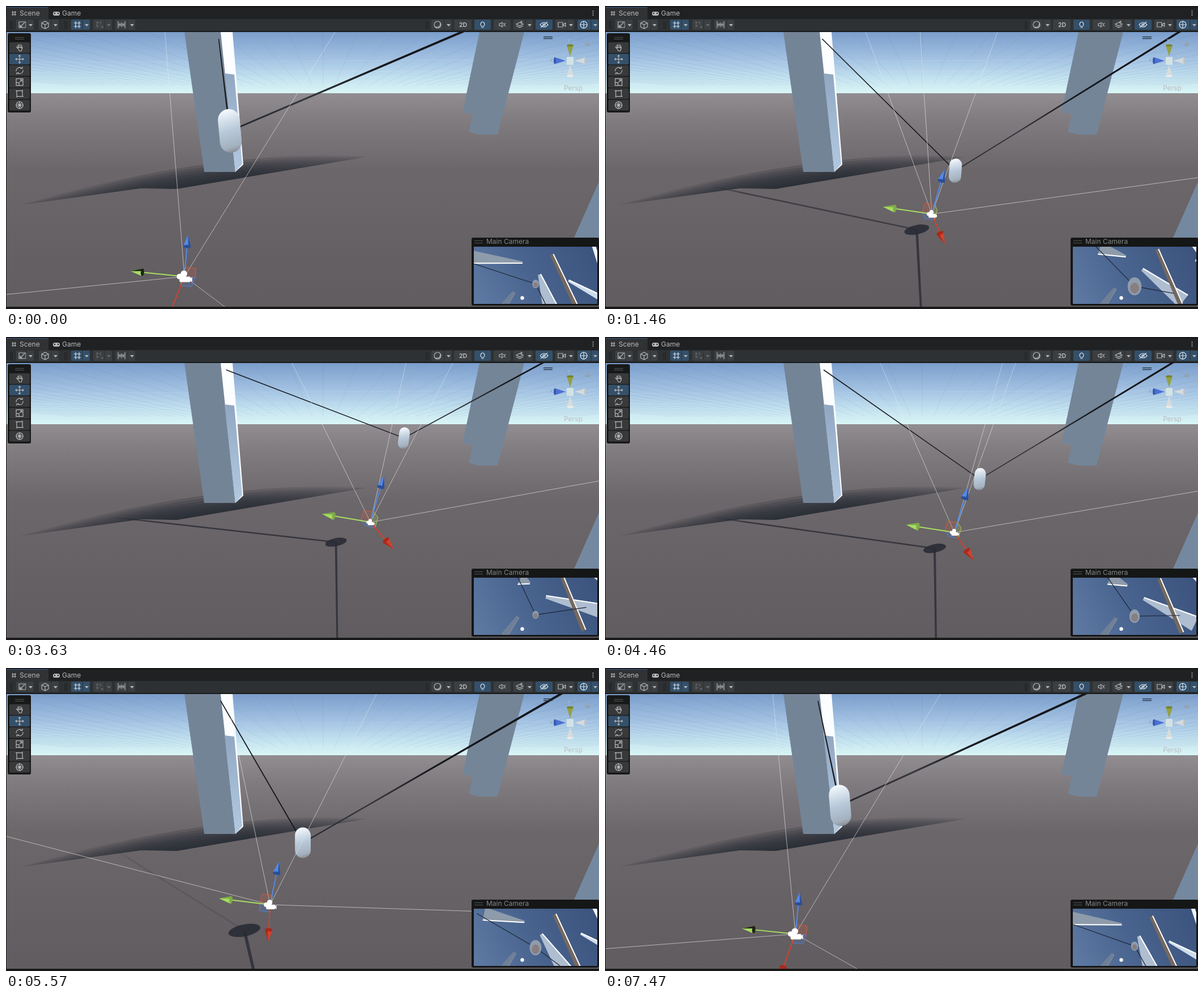
Recreate the animation shown at these times as an HTML page with a canvas. Size 1047 by 535 pixels, loop 7.54 s.

```html
<!DOCTYPE html>
<html lang="en">
<head>
<meta charset="utf-8">
<title>Scene view</title>
<style>
html, body { margin: 0; width: 100%; height: 100%; overflow: hidden; background: #191919; }
canvas { position: absolute; left: 0; top: 0; }
span { position: absolute; font: 12px/16px Inter, Roboto, sans-serif; color: #b9b9b9; white-space: nowrap; }
</style>
</head>
<body>
<canvas id="view" width="1047" height="535"></canvas>
<span style="left:24px;top:5px">Scene</span>
<span style="left:99px;top:5px">Game</span>
<span style="left:800px;top:26px;font-size:10.5px;font-weight:600;color:#c4c4c4">2D</span>
<span style="left:985px;top:137px;color:#b9bcbe">Persp</span>
<span style="left:848px;top:408px;color:#858585">Main Camera</span>
<script>
const LOOP = 7540, STEPS = 108, TAU = Math.PI * 2, RAD = Math.PI / 180;
const FOCAL = 420, PITCH = 17.8 * RAD;
const GROUND = 10.3, CAMERA_HEIGHT = 9.85, SUN = { x: -0.72, z: -0.4 };
const c = document.getElementById('view').getContext('2d');

// World point (right, down, forward) to the stage; k is pixels per unit there.
function project(x, down, z) {
  const k = FOCAL / (z * Math.cos(PITCH) + down * Math.sin(PITCH));
  return { x: 523 + x * k, y: 289 + (down * Math.cos(PITCH) - z * Math.sin(PITCH)) * k, k };
}

// Pendulum on a 10.9 unit arm, swinging away to the right
function swing(t) {
  const reach = 57.8 + 5 * Math.exp(-t / 500);
  const angle = (2.5 + reach * Math.cos(TAU * (t - 3188) / 7474)) * RAD;
  const s = Math.sin(angle), x = (4.2 + 10.9 * s) / 1.38;
  return { s, x, down: 10.9 * Math.cos(angle) - 4.8, z: 14.1 + 0.95 * x };
}

function box(x, y, w, h, fill, r = 0) {
  c.fillStyle = fill;
  c.beginPath(); c.roundRect(x, y, w, h, r); c.fill();
}
function poly(fill, ...p) {
  c.fillStyle = fill;
  c.beginPath();
  for (let i = 0; i < p.length; i += 2) c.lineTo(p[i], p[i + 1]);
  c.closePath(); c.fill();
}
function line(color, w, x1, y1, x2, y2) {
  c.strokeStyle = color; c.lineWidth = w;
  c.beginPath(); c.moveTo(x1, y1); c.lineTo(x2, y2); c.stroke();
}
function oval(fill, x, y, rx, ry = rx, turn = 0) {
  c.fillStyle = fill;
  c.beginPath(); c.ellipse(x, y, rx, ry, turn, 0, TAU); c.fill();
}
function icon(path, x, y, color = '#a9a9a9', w = 1.2) {
  c.save(); c.translate(x, y);
  c.strokeStyle = color; c.lineWidth = w; c.stroke(new Path2D(path));
  c.restore();
}
function blend(x1, y1, x2, y2, ...stops) {
  const g = c.createLinearGradient(x1, y1, x2, y2);
  for (let i = 0; i < stops.length; i += 2) g.addColorStop(stops[i], stops[i + 1]);
  return g;
}
function taper(fill, x1, y1, x2, y2, w1, w2) {
  const d = Math.hypot(x2 - x1, y2 - y1) || 1, nx = (y1 - y2) / d / 2, ny = (x2 - x1) / d / 2;
  poly(fill, x1 + nx * w1, y1 + ny * w1, x2 + nx * w2, y2 + ny * w2,
    x2 - nx * w2, y2 - ny * w2, x1 - nx * w1, y1 - ny * w1);
}

function backdrop() {
  box(0, 46, 1047, 108, blend(0, 46, 0, 154, 0, '#7b9ecb', 0.45, '#a4c3e3', 0.75, '#c2e1ef', 1, '#daf6f6'));
  box(0, 154, 1047, 378, blend(0, 154, 0, 532, 0, '#918d91', 0.12, '#817c80', 0.35, '#6c676a', 1, '#615c60'));
  c.save();
  c.beginPath(); c.rect(0, 46, 1047, 94); c.clip();
  for (let i = -22; i <= 22; i++) line('#4a668a1c', 1, 560 + i * 14, 154, 560 + i * 62, 46);
  for (let i = 1; i < 12; i++) line('#e8f2ff26', 1, 0, 154 - 108 / i, 1047, 154 - 120 / i);
  c.restore();

  // Soft shadow at the foot of the pillar, built from stacked layers
  c.save();
  c.beginPath();
  for (const [x, y] of [[22, 200], [640, 200], [640, 266], [302, 323], [238, 322], [22, 352]]) c.lineTo(x, y);
  c.clip();
  c.fillStyle = blend(22, 0, 640, 0, 0, '#20252f08', 0.35, '#20252f34', 0.65, '#20252f38', 1, '#20252f06');
  for (let i = 0; i < 8; i++) {
    c.beginPath();
    c.moveTo(22, 352);
    c.quadraticCurveTo(375 + i * 3, 250 + i * 9, 640, 266);
    c.lineTo(302, 323); c.lineTo(238, 322);
    c.fill();
  }
  c.restore();
}

function groundShadow({ s, x, down, z }) {
  const fall = GROUND - down, p = project(x + fall * SUN.x, GROUND, z + fall * SUN.z);
  const alpha = Math.max(0, Math.min(0.75, 0.5 + 0.8 * s)), dark = `rgba(36,39,48,${alpha})`;
  line(blend(187, 318, p.x, p.y, 0, '#24273000', 0.15, dark), 2.5, 187, 318, p.x, p.y);
  taper('#282b35c8', p.x, p.y, 594, 1211, p.k / 5, 0);
  oval('#282b35e0', p.x, p.y, p.k, p.k * 0.37, -0.2);
}

function pillars() {
  poly('#748497', 315, 46, 380, 46, 406, 293, 350, 293);
  poly('#fbfdff', 379, 46, 400, 46, 419, 280, 405, 293);
  poly(blend(0, 119, 0, 293, 0, '#91a7c1', 0.6, '#a6bdd6', 1, '#b2c8df'), 386, 119, 403, 121, 417, 279, 405, 293);
  poly('#748598', 836, 46, 915, 46, 868, 227, 835, 227, 817, 222, 824, 191, 806, 188);
  poly('#7489a0', 1047, 310, 1047, 409, 1003, 409);
}

function pendulum({ s, x, down, z }) {
  const p = project(x, down, z), top = project(x, down - 0.5, z), end = project(x, down + 0.5, z);
  const r = p.k / 2;
  taper('#17191d', 382 + 8 * s, 58, p.x, p.y, 1.6, r / 7);
  taper(blend(p.x, p.y, 1475, -240, 0, '#202328', 0.12, '#34383d', 0.25, '#14161a'), p.x, p.y, 1475, -240, r / 7, 6);
  c.lineCap = 'round';
  line(blend(top.x - r * 0.5, top.y - r, end.x + r * 0.5, end.y + r,
    0, '#fafdff', 0.25, '#d6e1ec', 0.5, '#b8c8d8', 0.85, '#a4b1bf', 1, '#85868c'), p.k, top.x, top.y, end.x, end.y);
  c.lineCap = 'butt';
}

function cone(x, y, [dx, dy], color, dark, size) {
  const d = Math.hypot(dx, dy), ux = dx / d, uy = dy / d, tx = x + dx, ty = y + dy;
  const bx = tx - ux * size, by = ty - uy * size, w = size * 0.32;
  line(color, 2, x, y, bx, by);
  poly(color, tx, ty, bx - uy * w, by + ux * w, bx + uy * w, by - ux * w);
  poly(dark, tx, ty, bx - uy * w, by + ux * w, bx - uy * w * 0.35, by + ux * w * 0.35);
  oval(dark, bx, by, size * 0.14, w, Math.atan2(uy, ux));
}

function cameraGizmo({ s, x, z }) {
  const q = s * s, p = project(x - 1.8 + 0.6 * s - 1.6 * q, CAMERA_HEIGHT, z), near = s < -0.55;
  const blue = [21 + 11 * s - 9 * q, -78 - 5 * s];
  const green = [-87 + 6 * s - 5 * q, -12 - 3 * s];
  const red = [16 + 45 * s - 18 * q, 56 - 20 * s + 12 * q];

  // View frustum edges run along forward ± right ± up.
  const haze = blend(0, 46, 0, 200, 0, '#eef2f670', 1, '#e2e2e2a8');
  for (const i of [-1.1, 1.1]) for (const j of [-0.577, 0.577]) {
    const [dx, dy] = [0, 1].map(n => blue[n] + i * red[n] + j * green[n]), far = 1200 / Math.hypot(dx, dy);
    line(haze, 1, p.x, p.y, p.x + dx * far, p.y + dy * far);
  }

  const part = (v, k) => v.map(n => n * k);
  const g = part(green, near ? -0.2 : 0.2), b = part(blue, 0.22), r = part(red, 0.2);
  for (const [u, v, color] of [[g, b, '#d05a40'], [g, r, '#4d7fd8'], [b, r, '#a8cf58']]) {
    poly(color + '38', p.x, p.y, p.x + u[0], p.y + u[1], p.x + u[0] + v[0], p.y + u[1] + v[1], p.x + v[0], p.y + v[1]);
    c.strokeStyle = color; c.lineWidth = 1; c.stroke();
  }
  cone(p.x, p.y, red, '#cf432f', '#a72a1c', 21);
  cone(p.x, p.y, blue, '#5489ea', '#2b4f96', 21);
  cone(p.x, p.y, green, '#a6dd61', near ? '#1d2417' : '#7fab49', 21);
  c.save();
  c.translate(p.x, p.y); c.scale(p.k / 32, p.k / 32);
  box(-9, 0, 20, 10, '#fff', 2);
  oval('#fff', -1, -5, 6); oval('#fff', -9, 0, 5);
  poly('#fff', 8, 5, 14, 1, 14, 10);
  c.restore();
}

function compass() {
  for (const y of [54.5, 57.5]) line('#22303c', 1.3, 949, y, 965, y);
  const arms = [['#93a043', '#75842f'], ['#d4dadd', '#b9c3c9'], ['#d7dcdc', '#e8ebeb'], ['#4a70d3', '#3458ae']];
  arms.forEach(([color, base], i) => {
    c.save();
    c.translate(996, 96.5); c.rotate(i * TAU / 4);
    poly(color, -6, -27, 6, -27, 0, -8);
    oval(base, 0, -27, 6, 2);
    c.restore();
  });
  box(990, 90, 12, 14, '#d3e3e4', 1);
  icon('M-2-3 0 0 2-3M0 0V4', 994, 61, '#a9bac9', 1);
  icon('M-3-3 0 0-3 3M3-3 0 0 3 3', 963, 96, '#8aa2c8', 1);
  box(1023, 66, 8, 5, '#93a3b4');
  icon('M-2 0V-2A2 2 0 0 1 2-2V0', 1027, 66, '#93a3b4');
}

const MOVE = 'M-7 0H7M0-7V7M-5-2-7 0-5 2M5-2 7 0 5 2M-2-5 0-7 2-5M-2 5 0 7 2 5';
const GLOBE = 'M-6 0A6 6 0 1 0 6 0A6 6 0 1 0-6 0M-7 0H7M0-7V7';
const GRID = 'M-6-3H6M-6 3H6M-3-6V6M3-6V6';
const TOOLS = [
  'M-4 1-6-2M-3 1V-5M-1 0V-6M2 0V-6M4 1V-4M-4 0 0 6H3L5 0Z', MOVE,
  'M-6 1A6 6 0 0 1 4-4M1-4H5V-7M6-1A6 6 0 0 1-4 4M-1 4H-5V7',
  'M-6-6H6V6H-6ZM-6 1H-1V6M0 0 4-4M1-4H4V-1', 'M-5-5H5V5H-5ZM-7-5H-3M5-7V-3M7 5H3M-5 7V3',
  GLOBE + 'M-3-3 3 3M3-3-3 3'];
const BUTTONS = [ // x, width, icon, has menu, active
  [18, 31, 'M-6-5H6V5H-6ZM-4 4 4-4M-4 0V4H0', 1], [58, 35, 'M-6-3 0-6 6-3V4L0 7-6 4ZM-6-3 0 0 6-3M0 0V7', 1],
  [115, 33, GRID, 1, 1], [154, 33, 'M-6-4H0M-6 2H0M-4-6V5M2-6V0M5 2V6M2 4H7', 1], [193, 35, 'M-6-6V6M6-6V6M-6 0H6M-3-3V3M0-4V4M3-3V3', 1],
  [751, 36, 'M-6 0A6 6 0 1 0 6 0A6 6 0 1 0-6 0M-4 4Q5 6 5-3', 1], [791, 31, ''],
  [827, 29, 'M-2 3Q-5-1-2-4Q0-6 2-4Q5-1 2 3ZM-2 5H2', 0, 1], [861, 30, 'M-5-2H-3L0-4V4L-3 2H-5ZM2-3 6 3M6-3 2 3'],
  [896, 34, 'M-6-1 0-4 6-1 0 2ZM-6 2 0 5 6 2M3-7V-3M1-5H5', 1], [935, 30, 'M-7 0Q0-8 7 0Q0 8-7 0M-2 0A2 2 0 1 0 2 0A2 2 0 1 0-2 0M-6 5 6-5', 0, 1],
  [970, 33, 'M-6-4H2V4H-6ZM2 0 7-3V3Z', 1], [1009, 37, GLOBE, 1, 1]];

function chrome() {
  box(0, 0, 1047, 46, '#191a1b');
  box(0, 3, 1047, 20, '#202123');
  box(1, 3, 74, 21, '#303234');
  box(1, 2, 74, 1, '#3d5d84');
  box(0, 23, 1047, 21, '#2e3133');
  icon('M-4-2H4M-4 2H4M-2-4V4M2-4V4', 14, 13, '#b8b8b8');
  box(83, 10, 12, 7, '#b8b8b8', 3);
  oval('#222', 86, 13, 1.2); oval('#222', 92, 13, 1.2);
  for (const y of [9, 12.5, 16]) oval('#bbb', 1036.5, y, 1);
  for (const x of [8, 104, 742]) for (const d of [0, 3]) line('#1c1e1f', 1, x + d, 27, x + d, 41);
  for (const [x, w, path, menu, on] of BUTTONS) {
    const tint = x === 154 ? '#686b6d' : '#b4b7b9';
    box(x, 24, w, 18, on ? '#34506a' : '#3c3f41', 2);
    icon(path, menu ? x + 11 : x + w / 2, 33, on ? '#d5e2ee' : tint);
    if (menu) {
      line('#2c2f31', 1, x + w - 13, 24, x + w - 13, 42);
      poly(tint, x + w - 9, 32, x + w - 2, 32, x + w - 5.5, 36);
    }
  }
  box(3, 48, 41, 140, '#181919', 3);
  for (const y of [55.5, 58.5]) line('#555', 1, 16, y, 32, y);
  TOOLS.forEach((path, i) => {
    const y = 64 + i * 20.3;
    box(6, y, 36, 19, i === 1 ? '#34506a' : '#38393a', 2);
    icon(path, 24, y + 9.5, '#bababa');
  });
  box(0, 531, 1047, 4, '#191919');
  box(0, 46, 1, 485, '#1c1c1c');
}

// Preview beams: [near, far] pose of the tip, heading in degrees and length
const BEAMS = [
  { x: [912, 925], y: [453, 435], turn: [186, 205], len: [92, 20], w: [24, 4], fill: '#8e9baa' },
  { x: [942, 953], y: [474, 459], turn: [72, 15], len: [64, 110], w: [28, 6], fill: '#aebdd0' },
  { x: [964, 982], y: [439, 424], turn: [65, 68], len: [110, 102], w: [9, 7], fill: '#74685f' },
  { x: [993, 1075], y: [485, 425], turn: [28, 28], len: [64, 64], w: [11, 4], fill: '#cddcec' },
  { x: [1036, 1036], y: [419, 419], turn: [72, 40], len: [42, 20], w: [7, 6], fill: '#eef4fa' },
  { x: [897, 904], y: [505, 494], turn: [126, 126], len: [32, 42], w: [13, 6], fill: '#6f7f96', edge: '#76869c' }];

function preview({ s, down }) {
  const v = (s / 0.81 + 1) / 2, mix = ([a, b]) => a + (b - a) * v;
  const ray = (x, y, turn, len) => [x, y, x + len * Math.cos(turn * RAD), y + len * Math.sin(turn * RAD)];
  box(822, 409, 225, 120, '#151616', 3);
  for (const y of [414.5, 418.5]) line('#555', 1, 827, y, 842, y);
  c.save();
  c.beginPath(); c.rect(826, 425, 218, 101); c.clip();
  box(826, 425, 218, 101, blend(826, 526, 1044, 425, 0, '#5f7aa3', 0.45, '#49648f', 1, '#3b537d'));
  for (const { x, y, turn, len, w: [wide, thin], fill, edge = '#fff' } of BEAMS) {
    const p = ray(mix(x), mix(y), mix(turn), mix(len)), a = (mix(turn) - 90) * RAD;
    const nx = Math.cos(a) / 2, ny = Math.sin(a) / 2;
    taper(fill, ...p, thin, wide);
    line(edge, 2, p[0] + nx * (thin - 2), p[1] + ny * (thin - 2), p[2] + nx * (wide - 2), p[3] + ny * (wide - 2));
  }
  const h = 62 / (CAMERA_HEIGHT - down), y = 487 + h / 2;
  line('#1f2733', 1.2, ...ray(935, y, 198 + 46 * v, 120));
  line('#1f2733', 1.2, ...ray(935, y, 64 - 115 * v + 43 * v * v, 40 + 50 * v));
  oval('#8f9cae', 935, y, h * 0.77, h);
  oval('#877f80', 935, y + h * 0.2, h * 0.5, h * 0.6);
  oval('#fff', 911.5, 515.5, 3.2);
  c.restore();
}

function draw(now) {
  const step = Math.floor((now % LOOP) * STEPS / LOOP + 0.25) % STEPS;
  const bob = swing(step * LOOP / STEPS);
  backdrop();
  groundShadow(bob);
  pillars();
  pendulum(bob);
  cameraGizmo(bob);
  compass();
  chrome();
  preview(bob);
}

let start;
function tick(now) {
  start ??= now;
  draw(now - start);
  requestAnimationFrame(tick);
}
draw(0);
requestAnimationFrame(tick);
</script>
</body>
</html>
```
